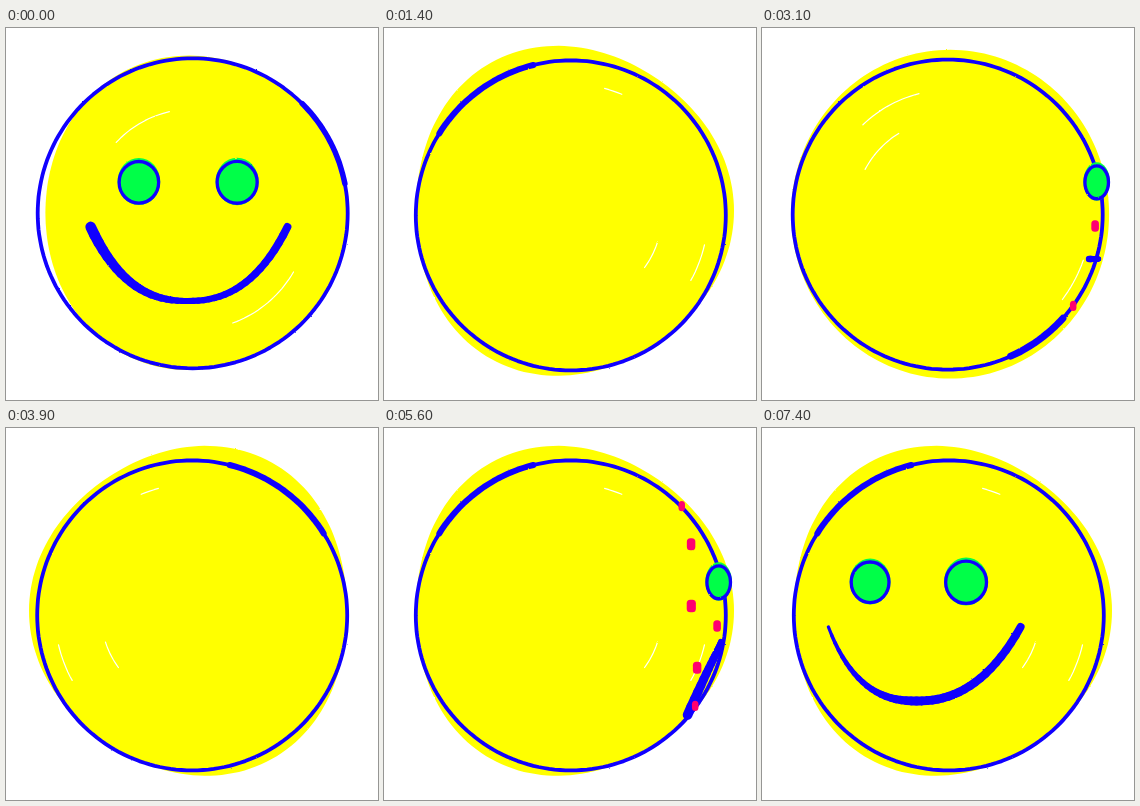
Write an HTML page that moves like this. It is 372 px wide and 372 px high and loops after 7500 ms.

```html
<!DOCTYPE html>
<html lang="en">
<head>
<meta charset="utf-8">
<title>Turning smiley</title>
<style>
  html, body { margin: 0; width: 100%; height: 100%; overflow: hidden; background: #fff; }
  svg { display: block; width: 100vw; height: 100vh; }
  path, line { stroke-linecap: round; stroke-linejoin: round; }
</style>
</head>
<body>
<svg viewBox="0 0 372 372">
  <filter id="rough" x="0" y="0" width="372" height="372" filterUnits="userSpaceOnUse" color-interpolation-filters="sRGB">
    <feTurbulence type="fractalNoise" baseFrequency="0.25" numOctaves="2" seed="4"/>
    <feDisplacementMap in="SourceGraphic" scale="1.5" xChannelSelector="R" yChannelSelector="G"/>
  </filter>
  <g filter="url(#rough)">
    <g id="ball"></g>
    <g id="face"></g>
  </g>
</svg>
<script>
const CX = 187, CY = 186, R = 155;
const STEP = 100, FRAMES = 75, TURN = 25;
const YELLOW = '#ffff00', BLUE = '#1000ff', GREEN = '#00ff48', RED = '#ff0070';
const sin = deg => Math.sin(deg * Math.PI / 180);
const cos = deg => Math.cos(deg * Math.PI / 180);
const ballEl = document.getElementById('ball');
const faceEl = document.getElementById('face');

// Each ball is a blob (grown, shifted, three-lobed) under a shifted circle.
// Heavy strokes are [from, to, width]; scratches are [radius, from, to].
const drawings = [
  { grow: -0.6, shift: [1.9, -1.2], lobes: 2.2, ring: [-0.3, -0.7],
    heavy: [315, 350, 5.5], scratches: [[105, 223, 258], [116, 30, 70]] },
  { grow: 6.7, shift: [1.1, 0.2], lobes: 0, ring: [-1.3, 0.6],
    heavy: [42, 66, 7], scratches: [[95, 208, 239], [124, 226, 256], [142, 19, 37]] },
  { grow: 6.7, shift: [-0.8, -3.2], lobes: 4.8, ring: [-0.2, 1.4],
    heavy: [212, 256, 6], scratches: [[91, 18, 37], [137, 13, 29], [130, 285, 294]] },
  { grow: 5.5, shift: [-0.6, -3.6], lobes: 1.5, ring: [0.3, -0.9],
    heavy: [165, 200, 5.5], scratches: [[136, 244, 263], [110, 240, 271]] }
];

function arc(radiusAt, from, to, [dx, dy] = [0, 0]) {
  const points = [];
  for (let deg = from; deg <= to; deg += 2) {
    const r = radiusAt(deg);
    points.push(`${(CX + dx + r * cos(deg)).toFixed(1)} ${(CY + dy + r * sin(deg)).toFixed(1)}`);
  }
  return 'M' + points.join('L');
}

const stroke = (d, color, width) =>
  `<path d="${d}" fill="none" stroke="${color}" stroke-width="${width}"/>`;

function drawBall({ grow, shift, lobes, ring, heavy: [from, to, width], scratches }, transform = '') {
  const blob = deg => R + grow - 2.7 * cos(2 * deg) + lobes * cos(3 * deg);
  const circle = () => R;
  return `<g transform="${transform}">` +
    `<path d="${arc(blob, 0, 358, shift)}Z" fill="${YELLOW}"/>` +
    scratches.map(([r, a, b]) => stroke(arc(() => r, a, b), '#fff', 1.2)).join('') +
    stroke(arc(circle, 0, 358, ring) + 'Z', BLUE, 3.8) +
    stroke(arc(circle, from, to, ring), BLUE, width) +
    '</g>';
}

const [a, c, b, d] = drawings;
const mirror = 'translate(373 0) scale(-1 1)';
const balls = [drawBall(a), drawBall(c), drawBall(b), drawBall(b, mirror), drawBall(d), drawBall(d, mirror)];

// Spots sit on a ring around the face, plus one on the cheek: [longitude, y].
const CHEEK = [-28, 198];
const ringSpots = Array.from({ length: 10 }, (_, i) => [48 * cos(36 * i), 178 + 105 * sin(36 * i)]);

const curve = u => 74 * Math.abs(u) ** 2.3;
const moods = [
  { mid: -2, half: 41, weight: 1, mouthY: u => 273 - curve(u), spots: [] },
  { mid: 0, half: 30, weight: 0.6, mouthY: () => 231, spots: [CHEEK, ...ringSpots.slice(0, 4)] },
  { mid: -3, half: 45, weight: 0.9, mouthY: u => 213 + curve(u), spots: [CHEEK, ...ringSpots] }
];

const latRadius = y => Math.sqrt(R * R - (y - CY) ** 2);

function drawEye(deg, y) {
  const facing = cos(deg);
  if (facing < -0.03) return '';
  const x = CX + 151 * sin(deg);
  const rx = 11 + 11 * facing, ry = 18 + 6 * facing;
  return `<ellipse cx="${x}" cy="${y}" rx="${rx}" ry="${ry}" fill="${GREEN}"/>` +
    `<ellipse cx="${x}" cy="${y + 0.8}" rx="${rx - 1.5}" ry="${ry - 2.8}" fill="none" stroke="${BLUE}" stroke-width="3.3"/>`;
}

function drawSpot(deg, y) {
  const facing = cos(deg);
  if (facing < -0.05) return '';
  const x = CX + latRadius(y) * sin(deg);
  const w = 6 + 5 * Math.max(0, facing), h = 10 + 4 * Math.max(0, facing);
  return `<rect x="${x - w / 2}" y="${y - h / 2}" width="${w}" height="${h}" rx="3.5" fill="${RED}"/>`;
}

function drawMouth({ mid, half, weight, mouthY }, turn, leaving) {
  const [start, middle, end] = leaving ? [11, 6, 8] : [3, 9, 8];
  let out = '', last = null;
  for (let u = -1; u <= 1.001; u += 0.05) {
    const deg = mid + half * u + turn, y = mouthY(u);
    const dx = 150 * sin(deg);
    const visible = cos(deg) > 0 && Math.abs(dx) < latRadius(y) + 2;
    const point = visible ? [CX + dx, y] : null;
    if (last && point) {
      const width = weight * (middle + ((u < 0 ? start : end) - middle) * Math.abs(u));
      out += `<line x1="${last[0]}" y1="${last[1]}" x2="${point[0]}" y2="${point[1]}" stroke="${BLUE}" stroke-width="${width}"/>`;
    }
    last = point;
  }
  return out;
}

function drawFace(frame) {
  const lap = Math.round(frame / TURN);
  const phase = frame - lap * TURN;
  const turn = 16.5 * phase + (phase < 0 ? 6 : 0);
  if (Math.abs(turn) > 160) return '';
  const mood = moods[lap % moods.length];
  return drawMouth(mood, turn, phase >= 0) +
    mood.spots.map(([deg, y]) => drawSpot(deg + turn, y)).join('') +
    drawEye(turn - 21, 153.5) + drawEye(turn + 17, 153.5);
}

let shown = -1;
function render(time) {
  const frame = Math.floor(time / STEP) % FRAMES;
  if (frame === shown) return;
  shown = frame;
  ballEl.innerHTML = balls[frame % balls.length];
  faceEl.innerHTML = drawFace(frame);
}

const begin = performance.now();
function tick() {
  render(performance.now() - begin);
  requestAnimationFrame(tick);
}
tick();
</script>
</body>
</html>
```
